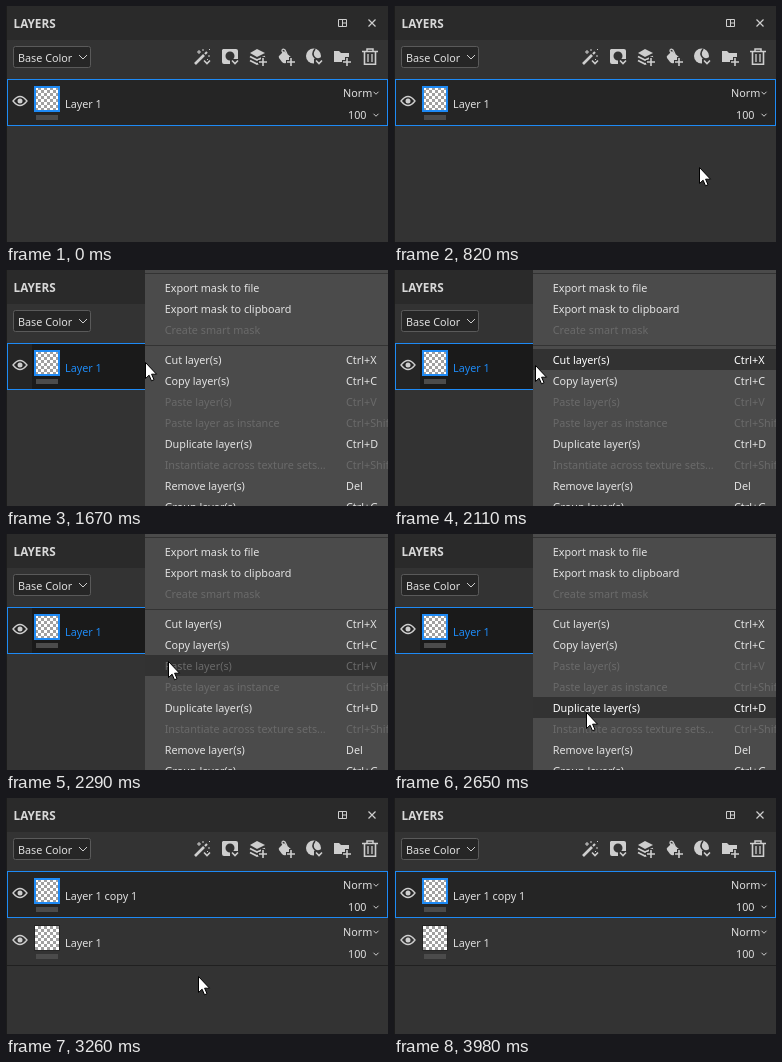
Write an HTML page with a canvas that moves like this. It is 382x236 px and loops after 4510 ms.

```html
<!DOCTYPE html>
<html lang="en">
<head>
<meta charset="utf-8">
<title>Duplicating a layer</title>
<style>
  html, body { margin: 0; width: 100%; height: 100%; overflow: hidden; background: #333; }
  canvas { display: block; }
</style>
</head>
<body>
<canvas id="stage" width="382" height="236"></canvas>
<script>
const ctx = document.getElementById('stage').getContext('2d');
const LOOP = 4510;
const BLUE = '#1e8af5', ICON = '#cecece', TEXT = '#dedede', PANEL = '#333333';

function rect(x, y, w, h, color) {
  ctx.fillStyle = color;
  ctx.fillRect(x, y, w, h);
}

function text(str, x, y, color = TEXT, font = '10.8px') {
  ctx.font = `${font} "Noto Sans", "Open Sans", sans-serif`;
  ctx.fillStyle = color;
  ctx.fillText(str, x, y);
}

function fill(d, color = ICON) {
  ctx.fillStyle = color;
  ctx.fill(new Path2D(d), 'evenodd');
}

function stroke(d, width = 1, color = ICON) {
  ctx.strokeStyle = color;
  ctx.lineWidth = width;
  ctx.stroke(new Path2D(d));
}

function at(x, y, draw) {
  ctx.save();
  ctx.translate(x, y);
  draw();
  ctx.restore();
}

const chevron = (x, y, r, width = 1) => stroke(`M${x - r} ${y - r / 2}l${r} ${r}l${r} ${-r}`, width);
const plus = (x, y) => {
  stroke(`M${x - 5} ${y}h10M${x} ${y - 5}v10`, 4, PANEL);
  stroke(`M${x - 4} ${y}h8M${x} ${y - 4}v8`, 1.6);
};
const badge = (x, y) => {
  fill(`M${x - 5} ${y - 3}h10v7h-10z`, PANEL);
  chevron(x, y, 3, 1.6);
};

// Toolbar icons, each drawn around its own centre.
const toolbar = [
  [196, () => {
    stroke('M-7 7L2 -2', 2.6);
    stroke('M3 -3L5 -5', 2.2);
    stroke('M-3 -7v4M-5 -5h4M1 -8v2M6 -1h2M5 2l1 1M7 -7l1 -1');
    chevron(5, 5, 3, 1.6);
  }],
  [224, () => {
    fill('M-7 -8H6Q8 -8 8 -6V7H-6Q-8 7 -8 5V-7zM4.5 -1A4.5 4.5 0 1 0 -4.5 -1A4.5 4.5 0 1 0 4.5 -1z');
    badge(5, 5);
  }],
  [252, () => {
    fill('M-1 -8L7 -4L-1 0L-8 -4z');
    stroke('M-8 -.5L-1 3L7 -.5M-8 3.5L-1 7L7 3.5', 1.8);
    plus(5, 5);
  }],
  [280, () => {
    fill('M-2 -6L6 1L0 6Q-2 7 -4 5L-7 1Q-8 -1 -6 -2z');
    stroke('M-1 -1L-4 -6Q-4 -9 -1 -7L1 -3', 1.3);
    fill('M6 1Q8 3 7 5Q5 5 6 1z');
    plus(5, 5);
  }],
  [308, () => {
    fill('M7 -1A7.5 7.5 0 1 0 -8 -1A7.5 7.5 0 1 0 7 -1z');
    stroke('M1 -8Q-3 -3 1 1Q4 3 7 1', 1.6, PANEL);
    badge(5, 5);
  }],
  [336, () => {
    fill('M-8 -6h5l2 2h8v9h-15z');
    plus(5, 5);
  }],
  [364, () => {
    stroke('M-8 -5.5H8M-3 -6V-8H3V-6', 1.5);
    stroke('M-5.5 -5V7.2H5.5V-5', 1.6);
    stroke('M-2 -3V5M2 -3V5', 1.3);
  }],
];

function drawHeader() {
  rect(0, 0, 382, 236, PANEL);
  rect(0, 0, 382, 34, '#2a2a2a');
  text('LAYERS', 7.5, 22, '#d8d8d8', 'bold 11.75px');
  stroke('M332.5 13.5h8v7h-8zM336.5 13.5v7M336.5 17h4');
  stroke('M362.5 13.5l7 7M369.5 13.5l-7 7', 1.2);
  ctx.beginPath();
  ctx.roundRect(7.5, 40.5, 77, 21, 2);
  ctx.fillStyle = '#262626';
  ctx.fill();
  ctx.strokeStyle = '#5a5a5a';
  ctx.lineWidth = 1;
  ctx.stroke();
  text('Base Color', 12, 56);
  chevron(77, 51, 4);
  for (const [x, draw] of toolbar) at(x, 51, draw);
}

function drawThumbnail(selected, ready) {
  rect(29, 8, 24, 24, ready ? '#ffffff' : '#252525');
  if (ready) {
    for (let i = 0; i < 64; i++) {
      const col = i % 8, row = i >> 3;
      if ((col + row) % 2) rect(29 + col * 3, 8 + row * 3, 3, 3, '#a0a0a0');
    }
  }
  if (selected) stroke('M29 8h24v24h-24z', 2, BLUE);
  else stroke('M28.5 7.5h25v25h-25z', 1, '#252525');
  rect(30, 36, 22, 5, '#4b4b4b');
}

function drawLayer(y, name, { selected = false, hovered = false, ready = true }) {
  at(0, y, () => {
    if (selected) {
      rect(1, 0, 381, 47, BLUE);
      rect(2, 1, 379, 45, '#252525');
      if (hovered) rect(26, 1, 355, 45, '#1a1a1a');
    } else {
      rect(1, 47, 381, 1, '#202020');
    }
    stroke('M7 22Q14 13 21 22Q14 31 7 22z', 1.3);
    fill('M16.5 22A2.5 2.5 0 1 0 11.5 22A2.5 2.5 0 1 0 16.5 22z');
    drawThumbnail(selected, ready);
    text(name, 59, 29, hovered ? BLUE : TEXT);
    text('Norm', 337, 18);
    chevron(370, 14, 2.5);
    text('100', 342, 40);
    chevron(370, 36, 2.5);
  });
}

// Label, shortcut, enabled, baseline
const menu = [
  ['Export mask to file', '', true, 22],
  ['Export mask to clipboard', '', true, 43],
  ['Create smart mask', '', false, 64],
  ['Cut layer(s)', 'Ctrl+X', true, 94],
  ['Copy layer(s)', 'Ctrl+C', true, 115],
  ['Paste layer(s)', 'Ctrl+V', false, 136],
  ['Paste layer as instance', 'Ctrl+Shift+V', false, 157],
  ['Duplicate layer(s)', 'Ctrl+D', true, 178],
  ['Instantiate across texture sets...', 'Ctrl+Shift+D', false, 199],
  ['Remove layer(s)', 'Del', true, 220],
  ['Group layer(s)', 'Ctrl+G', true, 241],
];

function drawMenu(pointerY) {
  rect(139, 0, 243, 236, '#4b4b4b');
  rect(139, 3, 243, 1, PANEL);
  rect(139, 75, 243, 1, PANEL);
  for (const [label, keys, enabled, y] of menu) {
    const active = pointerY >= y - 15 && pointerY < y + 6;
    if (active) rect(139, y - 15, 243, 21, '#323232');
    const color = !enabled ? '#6a6a6a' : active ? '#ffffff' : '#e2e2e2';
    text(label, 158.7, y, color);
    text(keys, 340, y, color);
  }
}

function drawPointer([x, y]) {
  at(x + 0.5, y + 0.5, () => {
    const arrow = 'M0 0V16L3.6 12.7L6 18.3L8.5 17.2L6.1 11.7H11z';
    fill(arrow, '#ffffff');
    stroke(arrow, 1, '#000000');
  });
}

// The pointer is sampled in even steps between two times.
const stepIndex = (t, start, end, steps) =>
  Math.min(steps - 1, Math.floor((t - start) / (end - start) * (steps - 1) + 0.02));
const mix = (a, b, u) => a.map((v, i) => Math.round(v + (b[i] - v) * u));
const smooth = u => u * u * (3 - 2 * u);

function pointerAt(t) {
  if (t < 710) return null;
  if (t < 1240) {
    const u = 1 - (1 - stepIndex(t, 710, 1180, 9) / 8) ** 1.5;
    return mix(mix([360, 214], [200, 46], u), mix([200, 46], [143, 97], u), u);
  }
  if (t < 1300) return [140, 94];
  if (t < 1490) return [139, 93];
  if (t < 2110) return [139, 92];
  if (t < 2650) return mix([139, 92], [193, 177], smooth((stepIndex(t, 2110, 2590, 9) + 1) / 9));
  if (t < 3570) return [192, 178];
  if (t < 3980) return mix([192, 178], [300, 246], ((stepIndex(t, 3570, 3980, 8) + 1) / 8) ** 1.5);
  return null;
}

function draw(t) {
  const pointer = pointerAt(t);
  const menuOpen = t >= 1670 && t < 2890;
  const duplicated = t >= 2890;
  drawHeader();
  if (duplicated) {
    drawLayer(120, 'Layer 1', {});
    drawLayer(73, 'Layer 1 copy 1', { selected: true, ready: t >= 3260 });
  } else {
    const hovered = menuOpen || (pointer !== null && pointer[1] < 120);
    drawLayer(73, 'Layer 1', { selected: true, hovered });
  }
  rect(0, 0, 1, 236, '#1c1c1c');
  if (menuOpen) drawMenu(t >= 2110 ? pointer[1] : -99);
  if (pointer) drawPointer(pointer);
}

const begin = performance.now();
function tick() {
  draw((performance.now() - begin) % LOOP);
  requestAnimationFrame(tick);
}
tick();
</script>
</body>
</html>
```
